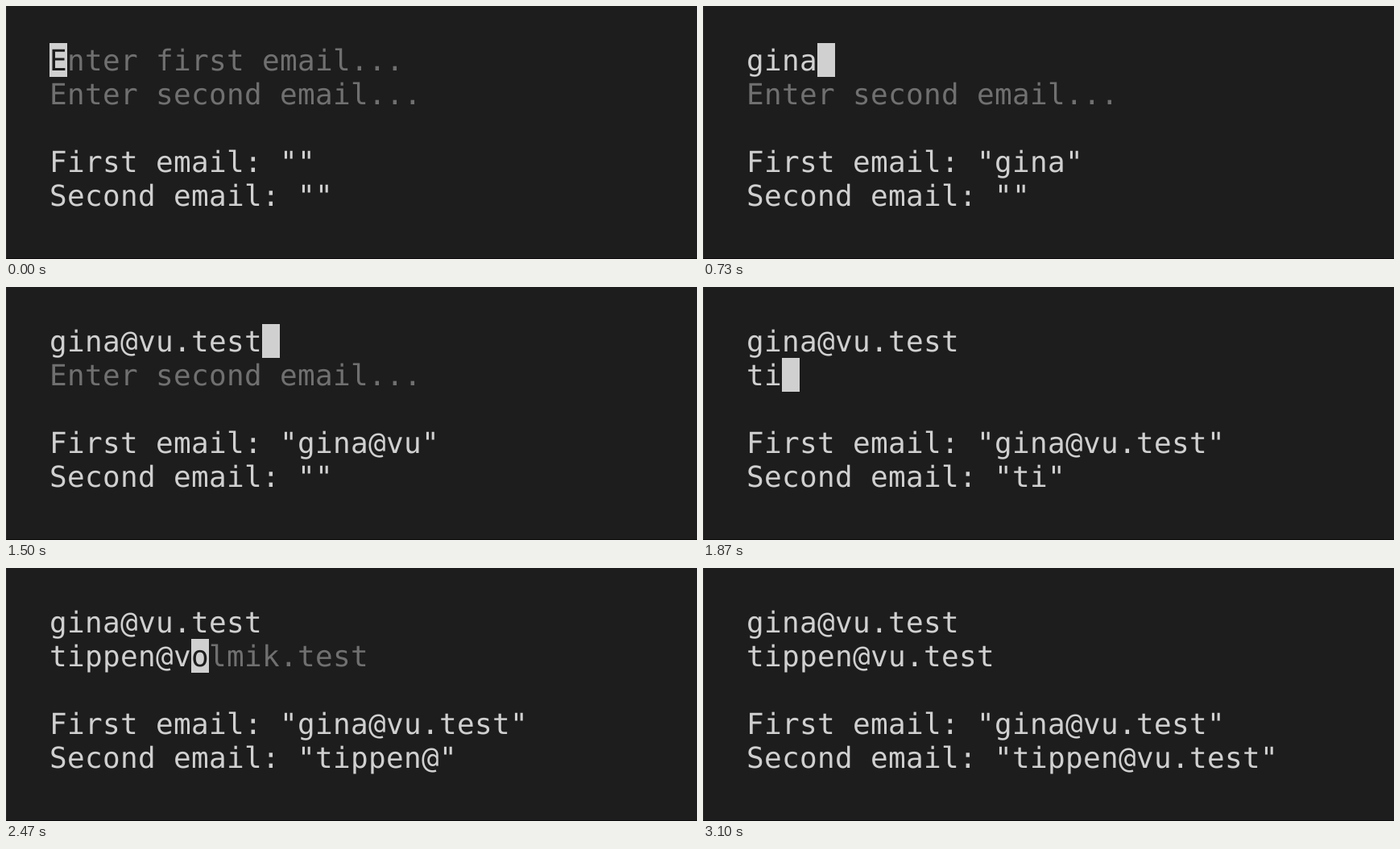
Animation of 858 by 314 pixels, one loop 3730 ms. Source, as an HTML page:

```html
<!DOCTYPE html>
<html lang="en">
<head>
<meta charset="utf-8">
<title>Email prompt</title>
<style>
  html, body { margin: 0; width: 100%; height: 100%; overflow: hidden; background: #1d1d1d; }
  svg { display: block; width: 858px; height: 314px; }
  text {
    font: 36px "DejaVu Sans Mono", monospace;
    letter-spacing: calc(22px - 1ch);
    text-rendering: geometricPrecision;
    font-variant-ligatures: none;
    white-space: pre;
    fill: #d0d0d0;
  }
  .dim { fill: #707070; }
  .under { fill: #1d1d1d; }
  #cursor { fill: #d0d0d0; }
  #edge { position: absolute; inset: 0; border-left: 1px solid #2b2b2b; border-bottom: 1px solid #0e0b0c; }
</style>
</head>
<body>
<svg id="term" viewBox="0 0 858 314"></svg>
<div id="edge"></div>
<script>
const LOOP = 3730;
const LEFT = 54, TOP = 46, CELL = 22, LINE = 42, BASELINE = 34;
const BEAT = 133, FAST = 70, LAG = 30;
const DOMAINS = ['mo.test', 'volmik.test', 'vu.test'];

// Each burst types its text one character per beat; Tab accepts the suggestion.
const fields = [
  {
    name: 'First', focus: 0, blur: 1600, tab: 1500,
    bursts: [
      { at: 130, text: 'g', lag: 170 },
      { at: 400, text: 'ina@' },
      { at: 1000, text: 'vu', beat: FAST }
    ]
  },
  {
    name: 'Second', focus: 1600, blur: 3100, tab: 3100,
    bursts: [
      { at: 1665, text: 'tippen' },
      { at: 2400, text: '@v', beat: FAST },
      { at: 2630, text: 'u' }
    ]
  }
];

const term = document.getElementById('term');

function add(parent, tag, attrs, content = '') {
  const el = document.createElementNS('http://www.w3.org/2000/svg', tag);
  for (const name in attrs) el.setAttribute(name, attrs[name]);
  el.textContent = content;
  parent.append(el);
  return el;
}

const cursor = add(term, 'rect', { id: 'cursor', width: CELL, height: LINE });
const rows = Array.from({ length: 5 }, (_, i) =>
  add(term, 'text', { x: LEFT, y: TOP + i * LINE + BASELINE }));

function completion(text) {
  const at = text.indexOf('@');
  if (at < 0) return '';
  const start = text.slice(at + 1);
  const match = DOMAINS.find(domain => domain.startsWith(start));
  return match ? match.slice(start.length) : '';
}

function valueAt(field, t, echoed) {
  let text = '';
  for (const { at, text: chars, beat = BEAT, lag = LAG } of field.bursts) {
    const elapsed = t - at - (echoed ? lag : 0);
    text += chars.slice(0, Math.max(0, Math.floor(elapsed / beat) + 1));
  }
  const accepted = t >= field.tab + (echoed ? LAG : 0) || t >= field.blur;
  return accepted ? text + completion(text) : text;
}

function drawInput(i, text, active) {
  const ghost = text ? (active ? completion(text) : '') : `Enter ${fields[i].name.toLowerCase()} email...`;
  rows[i].textContent = text;
  if (active) {
    cursor.setAttribute('x', LEFT + text.length * CELL);
    cursor.setAttribute('y', TOP + i * LINE);
    add(rows[i], 'tspan', { class: 'under' }, ghost.slice(0, 1));
  }
  add(rows[i], 'tspan', { class: 'dim' }, ghost.slice(active ? 1 : 0));
}

let shown = '';
function render(t) {
  const state = fields.map(field => ({
    text: valueAt(field, t, false),
    echo: valueAt(field, t, true),
    active: t >= field.focus && t < field.blur
  }));
  const key = JSON.stringify(state);
  if (key === shown) return;
  shown = key;
  cursor.setAttribute('visibility', state.some(s => s.active) ? 'visible' : 'hidden');
  state.forEach((s, i) => {
    drawInput(i, s.text, s.active);
    rows[i + 3].textContent = `${fields[i].name} email: "${s.echo}"`;
  });
}

const start = performance.now();
function tick() {
  render((performance.now() - start) % LOOP);
  requestAnimationFrame(tick);
}
tick();
</script>
</body>
</html>
```
